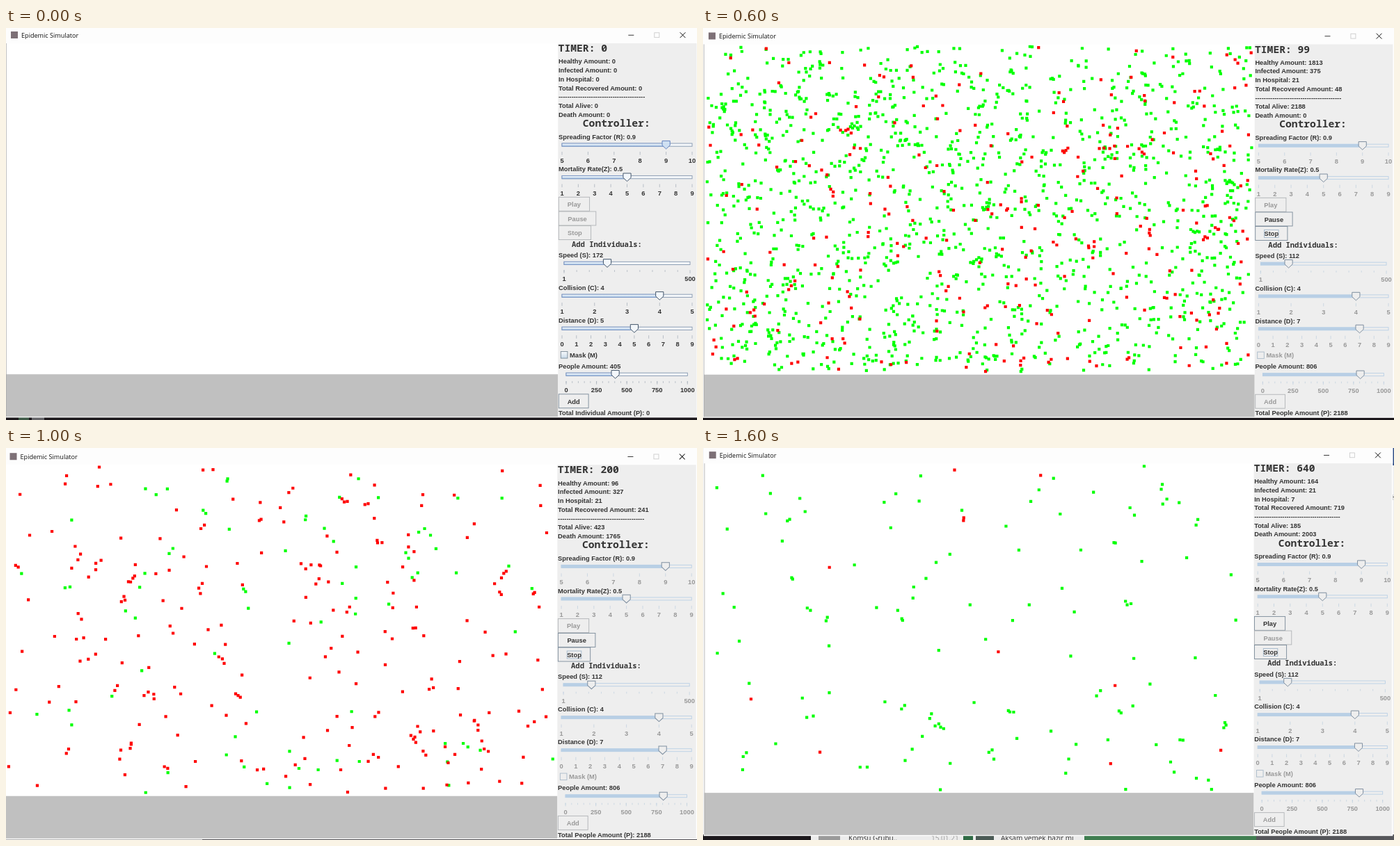
Recreate the animation shown at these times as an HTML page. Size 993x564 px, loop 1800 ms.

```html
<!DOCTYPE html>
<html lang="en">
<head>
<meta charset="utf-8">
<title>Epidemic Simulator</title>
<style>
  html, body { margin: 0; width: 100%; height: 100%; overflow: hidden; background: #fff; }
  svg { position: absolute; left: 0; top: 0; width: 993px; height: 564px; visibility: hidden; }
  text { font: bold 9.33px "Liberation Sans", Arial, sans-serif; fill: #333; white-space: pre; }
  .mono { font: bold 14.7px "Noto Sans Mono", monospace; }
  .small { font-size: 10.5px; }
  .title { font: 9.1px "Open Sans", sans-serif; fill: #111; }
  .chat { font: 10px "Open Sans", sans-serif; }
  .off { fill: #999; }
  .mid { text-anchor: middle; }
</style>
</head>
<body>
<script>
const STEP = 200;
const POPULATION = 2188;
const VISIBLE = .8; // share of people not hidden behind others

// Window placement (x, y, scale) and the simulation's counters at each step
const scenes = [
  { x: 0, y: 0, scale: 1, timer: 0, healthy: 0, infected: 0, hospital: 0, recovered: 0, mode: 'empty', back: 'dark' },
  { x: 1, y: 1, scale: .998, timer: 0, healthy: 2186, infected: 2, hospital: 0, recovered: 0, mode: 'ready', back: 'dark' },
  { x: 2.2, y: 2.1, scale: .9936, timer: 16, healthy: 2186, infected: 2, hospital: 0, recovered: 0, mode: 'paused', back: 'editor' },
  { x: 1, y: 1.5, scale: .998, timer: 99, healthy: 1813, infected: 375, hospital: 21, recovered: 48, mode: 'running', back: 'page' },
  { x: 0, y: 1.7, scale: .999, timer: 142, healthy: 584, infected: 1097, hospital: 21, recovered: 131, mode: 'running', back: 'page' },
  { x: -1.5, y: 2.2, scale: 1.0007, timer: 200, healthy: 96, infected: 327, hospital: 21, recovered: 241, mode: 'running', back: 'grey' },
  { x: 0, y: 1.6, scale: 1, timer: 348, healthy: 128, infected: 84, hospital: 18, recovered: 462, mode: 'running', back: 'grey' },
  { x: .4, y: -.6, scale: 1.0016, timer: 521, healthy: 157, infected: 28, hospital: 7, recovered: 637, mode: 'running', back: 'chat' },
  { x: 1.8, y: .2, scale: .9955, timer: 640, healthy: 164, infected: 21, hospital: 7, recovered: 719, mode: 'paused', back: 'chat' }
];

const rect = (x, y, w, h, fill, stroke) =>
  `<rect x="${x}" y="${y}" width="${w}" height="${h}" fill="${fill}"${stroke ? ` stroke="${stroke}" stroke-width=".9"` : ''}/>`;
const path = (d, fill, stroke = 'none', width = 1) =>
  `<path d="${d}" fill="${fill}" stroke="${stroke}" stroke-width="${width}"/>`;
// y is the middle of the capitals
const text = (x, y, str, cls = '', drop = 3.3) => `<text x="${x}" y="${y + drop}" class="${cls}">${str}</text>`;

function random(seed) {
  return () => {
    seed = seed + 0x6D2B79F5 | 0;
    let t = Math.imul(seed ^ seed >>> 15, 1 | seed);
    t = t + Math.imul(t ^ t >>> 7, 61 | t) ^ t;
    return ((t ^ t >>> 14) >>> 0) / 4294967296;
  };
}

function slider(y, label, { min, max, value, step = 1, minor, on, hot, x0 = 799, x1 = 986 }) {
  const pos = v => x0 + (v - min) / (max - min) * (x1 - x0);
  const at = pos(value);
  const tick = (v, h) => path(`M${pos(v)} ${y + 10}v${h}`, 'none', on ? '#a9b2bb' : '#c3d2e0', .8);
  let out = text(794, y - 11.6, label);
  out += on
    ? rect(x0, y - 2, x1 - x0, 4.2, '#f4f7fa', '#8396ae') + rect(x0, y - 2, at - x0, 4.2, 'url(#fill)', '#7592c4')
    : rect(x0, y - 2, x1 - x0, 4, '#eee', '#b8cfe5') + rect(x0 - .4, y - 2.2, at - x0, 4.4, '#b8cfe5');
  if (minor) for (let v = min; v <= max; v += minor) out += tick(v, 2.6);
  for (let v = min; v <= max; v += step) out += tick(v, 4.6) + text(pos(v), y + 22.7, v, on ? 'mid' : 'mid off');
  const edge = !on ? '#7f8fa0' : hot ? '#6382bf' : '#44566b';
  const face = !on ? '#eee' : hot ? '#cfe0f2' : '#f3f7fb';
  return out + path(`M${at - 5.6} ${y - 5.6}h11.2v6.4l-5.6 5.2l-5.6 -5.2z`, face, edge);
}

function button(y, w, label, on, focus) {
  const mid = 794.3 + w / 2;
  return rect(794.3, y, w, 20, '#eee', on ? '#7a8a99' : '#b0b3b6') +
    (focus ? rect(mid - 10.3, y + 5, 20.6, 11, 'none', '#a3b8cc') : '') +
    text(mid, y + 10.5, label, on ? 'mid' : 'mid off');
}

function panel({ timer, healthy, infected, hospital, recovered, mode }) {
  const empty = mode === 'empty', on = empty || mode === 'ready';
  const alive = healthy + infected;
  const speed = empty ? 172 : 112, distance = empty ? 5 : 7, people = empty ? 405 : 806;
  const lines = [
    `Healthy Amount: ${healthy}`, `Infected Amount: ${infected}`, `In Hospital: ${hospital}`,
    `Total Recovered Amount: ${recovered}`, '-'.repeat(40),
    `Total Alive: ${alive}`, `Death Amount: ${empty ? 0 : POPULATION - alive}`
  ];
  return rect(793.3, 22, 199.2, 537.5, '#eee') +
    text(793.6, 29, `TIMER: ${timer}`, 'mono', 5.2) +
    lines.map((str, i) => text(794, 48 + i * 12.75, str)).join('') +
    text(828.8, 136.8, 'Controller:', 'mono', 5.2) +
    slider(168, 'Spreading Factor (R): 0.9', { min: 5, max: 10, value: 9, on, hot: empty }) +
    slider(214.6, 'Mortality Rate(Z): 0.5', { min: 1, max: 9, value: 5, on }) +
    button(243.3, 44.3, 'Play', mode === 'ready' || mode === 'paused') +
    button(264, 53.5, 'Pause', mode === 'running') +
    button(284.6, 46.3, 'Stop', !on, !on) +
    text(813, 311, 'Add Individuals:', 'mono small', 3.7) +
    slider(338.3, `Speed (S): ${speed}`, { min: 1, max: 500, value: speed, step: 499, minor: 50, on, x0: 802, x1: 983 }) +
    slider(385.2, 'Collision (C): 4', { min: 1, max: 5, value: 4, on }) +
    slider(432.2, `Distance (D): ${distance}`, { min: 0, max: 9, value: distance, on }) +
    rect(797.3, 465.5, 9.6, 9.6, on ? 'url(#box)' : '#eee', on ? '#7a8a99' : '#a9bac9') +
    text(810, 470.5, 'Mask (M)', on ? '' : 'off') +
    slider(498.2, `People Amount: ${people}`,
      { min: 0, max: 1000, value: people, step: 250, minor: 50, on, x0: 805, x1: 979.3 }) +
    button(526.8, 42.8, 'Add', on) +
    text(794, 553.7, empty ? 'Total Individual Amount (P): 0' : `Total People Amount (P): ${POPULATION}`);
}

function frame() {
  return rect(-1, -5, 995, 565.5, '#fff') + rect(-1, -5, 995, 27, '#fdfdfd') +
    rect(7, 5, 10, 10, '#7d7076') +
    text(22, 10.2, 'Epidemic Simulator', 'title') +
    path('M894.3 10.3h8', 'none', '#222', .9) + rect(931.8, 6.8, 7, 6.8, 'none', '#ccc') +
    path('M968.6 6.3l7.8 7.8m0 -7.8l-7.8 7.8', 'none', '#111') +
    rect(0, 498.2, 793.3, 61, '#c0c0c0') + path('M.4 22v537', 'none', '#aaa', .8);
}

// What shows around the window's edges
function backdrop(kind) {
  const dark = '#1b171b';
  const bar = (x, w, fill) => rect(x, 556, w, 8, fill);
  if (kind === 'dark' || kind === 'editor')
    return rect(0, 0, 993, 564, kind === 'dark' ? dark : '#25262b') + bar(18, 15, '#3f5a48') + bar(37, 18, '#66666a');
  const side = rect(0, 0, 993, 564, '#f1f1f1') + rect(988, 0, 5, 25, '#2b4a85');
  if (kind === 'page') return side + bar(0, 993, dark);
  if (kind === 'grey') return side + bar(0, 993, '#333036') + rect(0, 562.6, 282, 1.4, '#a8a8a8');
  return side + bar(0, 993, '#ececec') + bar(0, 155, dark) + bar(166, 31, '#9a9a9a') +
    bar(374, 14, '#2f6b45') + bar(392, 26, '#4a5a55') + bar(548, 247, '#3f7d50') + bar(795, 198, '#55565a') +
    text(209, 562, 'Komşu Grubu..', 'chat') + text(328, 562, '15.01.21', 'chat off') +
    text(428, 562, 'Akşam yemek hazır mı', 'chat') + text(989.5, 72, 'H', 'chat');
}

// Scattered squares; some stand close to the one before
function people({ healthy, infected, hospital }, seed) {
  const rnd = random(seed);
  let x, y;
  const square = () => {
    const near = x > 20 && x < 770 && y > 40 && y < 480 && rnd() < .15;
    x = near ? x + rnd() * 16 - 8 : 2 + rnd() * 786;
    y = near ? y + rnd() * 16 - 8 : 23 + rnd() * 469;
    return `M${x.toFixed(1)} ${y.toFixed(1)}h4.2v4.2h-4.2z`;
  };
  const crowd = n => Array.from({ length: Math.round(n) }, square).join('');
  const sick = infected - hospital;
  return path(crowd(healthy * VISIBLE), '#0f0') + path(crowd(sick > 2 ? sick * VISIBLE : sick), '#f00');
}

const defs = `<defs>
  <linearGradient id="box" x2="0" y2="1"><stop stop-color="#f8fafc"/><stop offset="1" stop-color="#c9dae9"/></linearGradient>
  <linearGradient id="fill" x2="0" y2="1"><stop stop-color="#fff"/><stop offset="1" stop-color="#a9c6e4"/></linearGradient>
</defs>`;

document.body.innerHTML = scenes.map((scene, i) => `<svg viewBox="0 0 993 564">${i ? '' : defs}${backdrop(scene.back)}
  <g transform="translate(${scene.x} ${scene.y}) scale(${scene.scale})">${frame()}${people(scene, i * 977 + 41)}${panel(scene)}</g>
</svg>`).join('');

const layers = [...document.querySelectorAll('svg')];
const start = performance.now();
let shown = -1;

function draw(now) {
  const i = Math.floor(Math.max(0, now - start) / STEP) % layers.length;
  if (i !== shown) {
    if (shown >= 0) layers[shown].style.visibility = 'hidden';
    layers[i].style.visibility = 'visible';
    shown = i;
  }
  requestAnimationFrame(draw);
}
draw(start);
</script>
</body>
</html>
```
